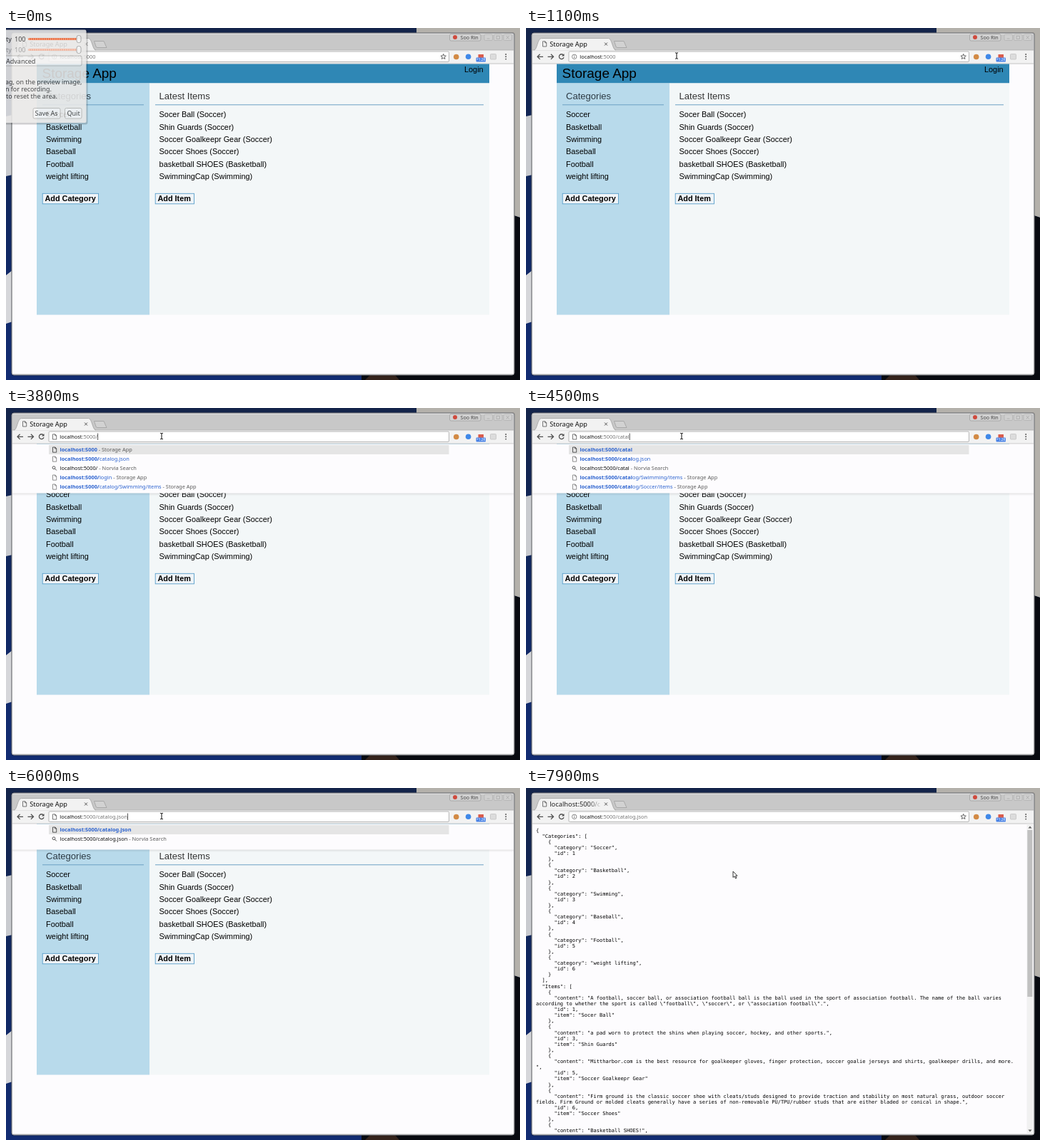
These frames come from a looping animation (720 px wide and 494 px high, 8 s). An HTML page:

```html
<!DOCTYPE html>
<html lang="en">
<head>
<meta charset="utf-8">
<title>Storage App</title>
<style>
html, body { margin: 0; width: 720px; height: 494px; overflow: hidden; background: #0f2250; }
svg { display: block; }
text { white-space: pre; }
.ui { font-family: "Noto Sans", "Open Sans", sans-serif; }
.page { font-family: "Liberation Sans", Arial, sans-serif; }
.mono { font-family: "DejaVu Sans Mono", monospace; }
</style>
</head>
<body>
<svg id="stage" width="720" height="494" viewBox="0 0 720 494"></svg>
<script>
const APP = 'Storage App';
const HOST = 'localhost', PORT = ':5000';
const LOOP = 8000;

const rect = (x, y, w, h, fill, more = '') =>
  `<rect x="${x}" y="${y}" width="${w}" height="${h}" fill="${fill}" ${more}/>`;
const text = (x, y, size, str, fill = '#000', more = '') =>
  `<text x="${x}" y="${y}" font-size="${size}" fill="${fill}" ${more}>${str}</text>`;
const line = (d, stroke, width = 1, more = '') =>
  `<path d="${d}" fill="none" stroke="${stroke}" stroke-width="${width}" ${more}/>`;
const shape = (d, fill, more = '') => `<path d="${d}" fill="${fill}" ${more}/>`;
const dot = (x, y, r, fill, more = '') => `<circle cx="${x}" cy="${y}" r="${r}" fill="${fill}" ${more}/>`;
const group = (id, body, more = '') => `<g id="${id}" ${more}>${body}</g>`;
const sheet = (x, y, color = '#555') =>
  line(`M${x} ${y}h3.4l1.8 1.8v5.4h-5.2zM${x + 3.2} ${y}v2h2`, color, 0.8);

function desktop() {
  return rect(0, 0, 720, 494, 'url(#wall)') +
    shape('M0 124L9 122V206L0 208z', '#c9cbcf') +
    shape('M0 347L9 340V412L0 415z', '#d6d7da') +
    shape('M575 0H720V266L708 262V8H575z', '#b4b1ab') +
    shape('M708 262L720 266V494H498V486H708z', '#080a10') +
    shape('M503 494L510 487H545L551 494z', '#34231c');
}

function frame() {
  const buttons = [670, 683.5, 697].map(x =>
    rect(x, 9, 11.5, 8.5, '#cfcfcf', 'rx="1.5" stroke="#b3b3b3" stroke-width=".8"')).join('');
  return rect(7, 6, 706, 482.500, '#000', 'rx="4" opacity=".22"') +
    rect(8, 7, 704, 480, '#c8c8c8', 'rx="3" stroke="#85878c"') +
    rect(9.5, 8, 701, 1, '#dedede') +
    rect(621.5, 8.5, 43.5, 9.5, '#d2d2d2', 'rx="2" stroke="#a0a0a0" stroke-width=".8"') +
    dot(629, 13, 3, '#cf4a3d') +
    text(636.5, 15.800, 7.2, 'Soo Rin', '#444', 'class="ui"') +
    buttons +
    line('M673.5 15h4M687 11.3h4.5v4h-4.5zM700.7 11l4 4.5m0-4.5l-4 4.5', '#aaa', 0.8) +
    shape('M123.5 18.5H137L141 27.5H128Q126.5 27.5 126 26z', '#d2d2d2', 'stroke="#a0a0a0" stroke-width=".8"') +
    rect(9, 31, 702, 19, '#f2f2f2') + line('M9 31H711', '#acacac', 0.8) +
    shape('M11 31.5C16 31 16 14.5 21.5 14.5H115.5C120.5 14.5 121 31 126 31.5z', '#f2f2f2') +
    line('M11 31C16 30.5 16 14.5 21.5 14.5H115.5C120.5 14.5 121 30.5 126 31', '#a3a3a3', 0.8) +
    line('M110 20.5l4 4m0-4l-4 4', '#555', 1) +
    line('M9 50H711', '#b9b9b9', 0.8);
}

function toolbar() {
  const star = Array.from({ length: 10 }, (_, i) => {
    const r = i % 2 ? 1.7 : 3.9, a = (i / 5 - 0.5) * Math.PI;
    return `${612.7 + r * Math.cos(a)} ${40.3 + r * Math.sin(a)}`;
  }).join('L');
  return line('M24 40.3H16m3.6-3.6l-3.6 3.6l3.6 3.6', '#505050', 1.3) +
    line('M30.5 40.3h8m-3.6-3.6l3.6 3.6l-3.6 3.6', '#505050', 1.3) +
    group('reload', line('M52.6 38.2A3.4 3.4 0 1 0 53 41.3', '#505050', 1.3) +
      shape('M53.5 36v3.6h-3.6z', '#505050')) +
    group('stop', line('M47 37.3l6 6m0-6l-6 6', '#505050', 1.2)) +
    rect(60, 33, 560.5, 14.5, '#fff', 'rx="1.5" stroke="#aeaeae" stroke-width=".9"') +
    group('info', dot(67.7, 40.3, 3.2, 'none', 'stroke="#666" stroke-width=".8"') +
      line('M67.7 39.8v2.3M67.7 38.2v.9', '#666', 0.9)) +
    group('sheetIcon', sheet(65.5, 36.8)) +
    group('star', line(`M${star}z`, '#555', 0.9)) +
    dot(630.7, 40.5, 3.8, '#d28a45') +
    dot(647.6, 40.3, 3.8, '#3f88e8') +
    rect(661.5, 37, 7.5, 5, '#da5c4c') +
    rect(658.5, 41.5, 13.5, 6, '#4a83e6', 'rx="1"') +
    text(665.2, 46.4, 4.8, '+1.2K', '#fff', 'class="ui" text-anchor="middle"') +
    rect(678.5, 36.5, 8, 7.5, '#dcdcdc', 'rx="1" stroke="#c2c2c2" stroke-width=".8"') +
    [37, 40.3, 43.6].map(y => dot(700.2, y, 0.95, '#505050')).join('');
}

function appPage() {
  const list = (x, rows) => rows.map((s, i) => text(x, 125.2 + i * 17.35, 10.88, s)).join('');
  const button = (x, w, s) => rect(x + 0.2, 232.3, w, 14.500, '#eef3f7', 'stroke="#5a9fca" stroke-width=".9"') +
    text(x + 3.4, 243.4, 10.88, s, '#000', 'font-weight="700"');
  return rect(9, 50.5, 702, 435, '#fdfcfe') +
    rect(43, 50.5, 634, 27, '#2f87b5') +
    rect(43, 77.5, 158, 325, '#b8daeb') +
    rect(201, 77.5, 476, 325, '#f3f7f8') +
    text(50.6, 70.3, 18.95, APP) + text(642, 62, 10.88, 'Login') +
    text(56, 99.8, 13.05, 'Categories', '#2c3a44') + text(214.6, 99.8, 13.05, 'Latest Items', '#333') +
    line('M51 107.8H193M209 107.8H669', '#6ba0c4', 1) +
    list(56, ['Soccer', 'Basketball', 'Swimming', 'Baseball', 'Football', 'weight lifting']) +
    list(214.6, ['Socer Ball (Soccer)', 'Shin Guards (Soccer)', 'Soccer Goalkeepr Gear (Soccer)',
      'Soccer Shoes (Soccer)', 'basketball SHOES (Basketball)', 'SwimmingCap (Swimming)']) +
    button(51, 78.3, 'Add Category') + button(209, 54.3, 'Add Item');
}

function jsonPage() {
  const sports = ['Soccer', 'Basketball', 'Swimming', 'Baseball', 'Football', 'weight lifting'];
  const items = [
    [1, 'Socer Ball', String.raw`A football, soccer ball, or association football ball is the ball used in the sport of association football. The name of the ball varies
according to whether the sport is called \"football\", \"soccer\", or \"association football\".`],
    [3, 'Shin Guards', 'a pad worn to protect the shins when playing soccer, hockey, and other sports.'],
    [5, 'Soccer Goalkeepr Gear', 'Mittharbor.com is the best resource for goalkeeper gloves, finger protection, soccer goalie jerseys and shirts, goalkeeper drills, and more.\n'],
    [6, 'Soccer Shoes', `Firm ground is the classic soccer shoe with cleats/studs designed to provide traction and stability on most natural grass, outdoor soccer
fields. Firm Ground or molded cleats generally have a series of non-removable PU/TPU/rubber studs that are either bladed or conical in shape.`],
    [7, 'basketball SHOES', 'Basketball SHOES!']
  ];
  const cats = sports.map((s, i) => `    {\n      "category": "${s}",\n      "id": ${i + 1}\n    }`);
  const goods = items.map(([id, name, about]) =>
    `    {\n      "content": "${about}",\n      "id": ${id},\n      "item": "${name}"\n    }`);
  const source = `{\n  "Categories": [\n${cats.join(',\n')}\n  ],\n  "Items": [\n${goods.join(',\n')}`;
  const rows = source.split('\n').map((s, i) => {
    const body = s.trimStart();
    return text(14 + (s.length - body.length) * 4.238, 61.5 + i * 8.115, 7.04, body);
  }).join('');
  return rect(9, 50.5, 702, 435, '#fdfcfe') + `<g clip-path="url(#view)">${rows}</g>` +
    rect(701.5, 50.5, 9, 435, '#f1f1f1') + rect(702.3, 59, 7, 234, '#c1c1c1') +
    shape('M703.5 56.5h5l-2.5-3zM703.5 479.5h5l-2.5 3z', '#606060');
}

function dialog() {
  const slider = (y, color, ink) => text(0, y + 3.5, 9, 'ty', ink) + text(12, y + 3.5, 9, '100', ink) +
    rect(31, y - 1.5, 71, 3, color, 'rx="1.5"') +
    line(`M32 ${y}H101`, '#fff', 2, 'stroke-dasharray="1 2" opacity=".4"') +
    rect(99, y - 5, 6, 10, '#f4f4f4', 'rx="2.5" stroke="#8e8e8e" stroke-width=".8"');
  const button = (x, y, w, h) => rect(x, y, w, h, '#f3f3f3', 'rx="2" stroke="#b3b0ad" stroke-width=".9"');
  return rect(-4, 2, 118.5, 133.5, '#000', 'rx="3" opacity=".2"') +
    rect(-4, 2.5, 116.5, 130.5, '#e9e8e7', 'rx="2"') +
    slider(15.5, '#ee6a3a', '#333') + slider(30.5, '#f0b39c', '#999') +
    button(-5, 39, 111, 14) + text(0, 49.5, 9, 'Advanced', '#333') +
    text(-1, 78.7, 8.9, 'ag, on the preview image,', '#333') +
    text(-1, 89, 8.9, 'n for recording.', '#333') + text(0, 99.3, 9, 'to reset the area.', '#333') +
    button(38, 112.5, 38, 14.5) + text(40.5, 123, 9, 'Save As', '#333') +
    button(82.5, 112.5, 23.5, 14.5) + text(85.5, 123, 9, 'Quit', '#333');
}

const beamPath = 'M-2-4.2Q0-4.2 0-3Q0-4.2 2-4.2M0-3V3M-2 4.2Q0 4.2 0 3Q0 4.2 2 4.2';
const beam = line(beamPath, '#fff', 2.2, 'opacity=".7"') + line(beamPath, '#222', 1.1);
const arrow = shape('M0 0V8.5L2 6.8L3.5 10L4.9 9.3L3.5 6.2H6z', '#fff', 'stroke="#222" stroke-width=".9"');

const stage = document.getElementById('stage');
stage.innerHTML = `<defs>
  <linearGradient id="wall" x2="0" y2="1"><stop stop-color="#14244a"/><stop offset=".5" stop-color="#10275f"/>
    <stop offset="1" stop-color="#122c72"/></linearGradient>
  <linearGradient id="fade" gradientUnits="userSpaceOnUse" x1="88" x2="104" y1="0" y2="0">
    <stop stop-color="#222"/><stop offset="1" stop-color="#222" stop-opacity=".1"/></linearGradient>
  <clipPath id="view"><rect x="9" y="50.5" width="692" height="435"/></clipPath>
  <clipPath id="tab"><rect x="33" y="14" width="71" height="17"/></clipPath></defs>` +
  desktop() + frame() +
  group('favicon', sheet(23.5, 18.8)) +
  group('appTitle', text(33.2, 25.5, 9.15, APP, '#111', 'font-weight="500"'), 'class="ui"') +
  group('urlTitle', text(33.2, 25.5, 9.3, 'localhost:5000/catalog.json', 'url(#fade)'), 'class="ui" clip-path="url(#tab)"') +
  group('app', appPage(), 'class="page"') + group('json', jsonPage(), 'class="mono"') +
  toolbar() + group('url', '', 'class="ui"') + group('drop', '', 'class="ui"') +
  group('dialog', dialog(), 'class="ui"') +
  group('pointer', group('beam', beam) + group('arrow', arrow));

const $ = id => document.getElementById(id);
const show = (id, on) => $(id).setAttribute('visibility', on ? 'visible' : 'hidden');

// Moments when the address gains its next characters
const keys = [[0, ''], [3800, '/'], [3900, '/c'], [4000, '/ca'], [4200, '/cat'], [4300, '/cata'], [4500, '/catal'],
  [4600, '/catalo'], [4700, '/catalog'], [4900, '/catalog.'], [5300, '/catalog.j'], [5500, '/catalog.js'],
  [5700, '/catalog.jso'], [5800, '/catalog.json']];
const path = [[300, 0, 118], [500, 90, 88], [800, 211, 39], [2200, 211, 39], [2300, 217, 39], [2400, 218, 39.5],
  [7200, 218, 39.5], [7500, 238, 43], [7700, 265, 61], [7800, 279, 92], [7900, 290, 117]];

function pointerAt(t) {
  const i = path.findIndex(p => p[0] > t);
  if (i < 1) return (i ? path[path.length - 1] : path[0]).slice(1);
  const [t0, x0, y0] = path[i - 1], [t1, x1, y1] = path[i], k = (t - t0) / (t1 - t0);
  return [x0 + (x1 - x0) * k, y0 + (y1 - y0) * k];
}

function suggestions(typed) {
  const base = HOST + PORT;
  const find = [base + typed, '', 'Norvia Search', true];
  const site = rest => [base + typed, rest.slice(typed.length), rest.endsWith('json') ? '' : APP];
  if (typed === '/')
    return [[base, '', APP], site('/catalog.json'), find, site('/login'), site('/catalog/Swimming/items')];
  if (typed === '/catalog.json') return [site(typed), find];
  const rows = [[base + typed, '', ''], site('/catalog.json'), find];
  return typed.includes('.') ? rows : [...rows, site('/catalog/Swimming/items'), site('/catalog/Soccer/items')];
}

function dropdown(typed) {
  const rows = suggestions(typed), h = rows.length * 11 + 14;
  const shadow = [3, 1.5].map(d => rect(9, 50.5, 702, h + d, '#000', 'opacity=".04"')).join('');
  return shadow + rect(9, 50.5, 702, h, '#fdfcfe') + rect(60, 52, 560.5, 13, '#e5e5e5') +
    rows.map(([bold, rest, note, search], i) => {
      const y = 58.5 + i * 13, ink = search ? '#111' : '#2b62cf';
      const icon = search
        ? dot(67, y - 0.8, 1.9, 'none', 'stroke="#444" stroke-width=".9"') + line(`M68.5 ${y + 0.7}l2.3 2.3`, '#444', 1)
        : sheet(65.5, y - 3.5, i ? '#777' : '#333');
      const tail = (rest && `<tspan fill="${ink}">${rest}</tspan>`) +
        (note && `<tspan fill="#5c5c5c"> - ${note}</tspan>`);
      const head = search ? bold : `<tspan font-weight="700" font-size="7.35">${bold}</tspan>`;
      return icon + text(75.5, y + 2.6, 7.4, head + tail, ink);
    }).join('');
}

function address(typed, selected, caret) {
  const url = $('url');
  url.innerHTML = text(75.3, 42.800, 7.4, `${HOST}<tspan fill="${selected ? '#111' : '#777'}">${PORT}${typed}</tspan>`, '#111');
  const end = 75.3 + url.firstChild.getComputedTextLength();
  if (selected) url.insertAdjacentHTML('afterbegin', rect(75, 35.5, end - 75, 9.5, '#b4d0ea'));
  if (caret) url.insertAdjacentHTML('beforeend', rect(end + 0.2, 35.5, 0.7, 9.5, '#111'));
}

let last = '';
function draw(t) {
  const typed = keys.filter(k => k[0] <= t).pop()[1];
  const typing = t >= 3800 && t < 6900, loaded = t >= 7200, loading = t >= 6900 && !loaded;
  const selected = t >= 1600 && t < 3000;
  const caret = (t >= 3000 && t < 3500) || (t >= 3800 && t < 6300);

  const state = [typed, selected, caret, typing].join();
  if (state !== last) {
    address(typed, selected, caret);
    $('drop').innerHTML = typing ? dropdown(typed) : '';
    last = state;
  }
  show('app', !loaded);
  show('appTitle', !loaded);
  show('json', loaded);
  show('urlTitle', loaded);
  show('favicon', !loading);
  show('reload', !loading);
  show('stop', loading);
  show('info', !typing);
  show('sheetIcon', typing);
  show('star', !typing);
  $('dialog').setAttribute('opacity', 0.88 * Math.max(0, Math.min(1, (400 - t) / 300)));

  const [x, y] = pointerAt(t), inBar = y > 33 && y < 47;
  $('pointer').setAttribute('transform', `translate(${x} ${y})`);
  show('beam', t >= 300 && inBar);
  show('arrow', t >= 300 && !inBar);
}

const start = performance.now();
function tick() {
  const t = (performance.now() - start) % LOOP;
  draw(Math.floor(t / 100) * 100);
  requestAnimationFrame(tick);
}
tick();
</script>
</body>
</html>
```
